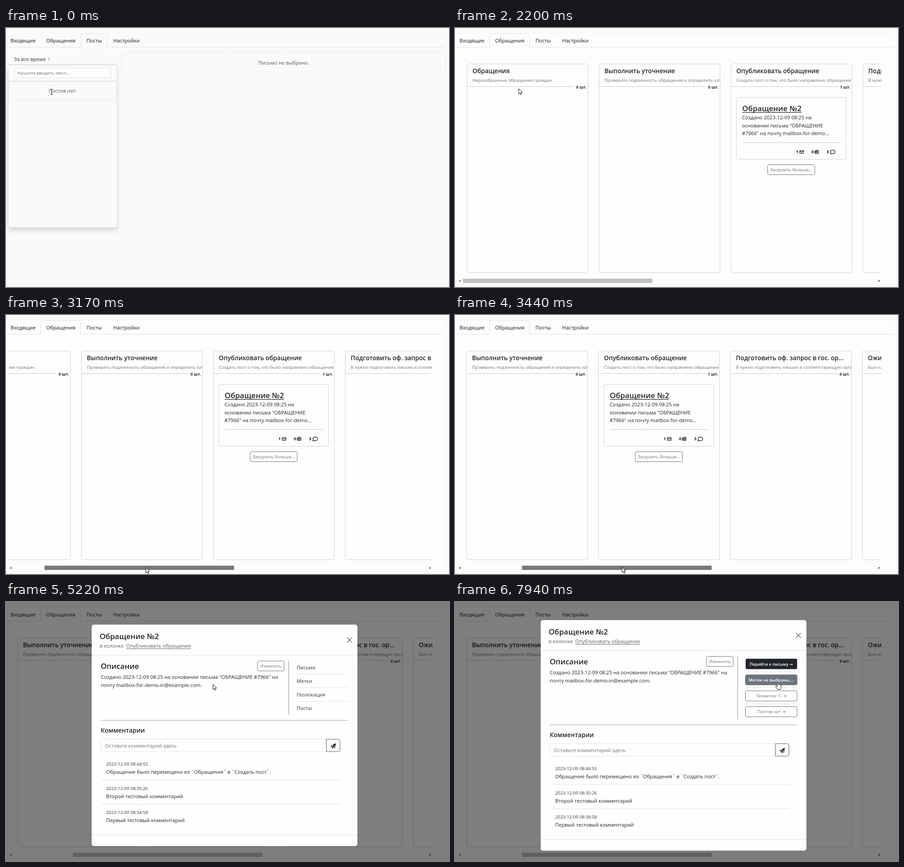
An HTML page with a canvas for the animation above (8 s loop, 977x573 px).

```html
<!DOCTYPE html>
<html lang="ru">
<head>
<meta charset="utf-8">
<title>Обращения</title>
<style>
  html, body { margin: 0; width: 100%; height: 100%; overflow: hidden; background: #fafafa; }
  canvas { display: block; width: 977px; height: 573px; }
</style>
</head>
<body>
<canvas id="stage"></canvas>
<script>
const W = 977, H = 573, LOOP = 8000, STEP = 120;
const canvas = document.getElementById('stage');
const ctx = canvas.getContext('2d');
const dpr = window.devicePixelRatio || 1;
canvas.width = W * dpr;
canvas.height = H * dpr;

const FONT = '"Open Sans", "Noto Sans", "DejaVu Sans", sans-serif';
const BODY = 11.1, SMALL = 9.65, H5 = 13.65, H4 = 16.6, TINY = 8.8;
const INK = '#212529', MUTED = '#6c757d', SOFT = '#dee2e6', EDGE = '#cfd1d3';

const OPEN_BOARD = 1650, LOAD_CARD = 1790, GRAB = 2930, RELEASE = 3690;
const OPEN_MODAL = 5220, LOAD_MODAL = 5370;

// Pointer moves: start time, number of steps, end point.
const MOVES = [
  [0, 1, 100, 141], [250, 5, 160, 153], [980, 1, 142, 130], [1130, 3, 115.5, 28],
  [2200, 5, 238, 560], [2930, 1, 247, 560.5], [3050, 2, 308, 559], [3320, 2, 368, 558],
  [3690, 5, 490, 234], [4290, 1, 493, 251], [4440, 1, 500, 247], [4590, 3, 352, 172],
  [5220, 1, 456, 182], [6660, 1, 476, 175], [6780, 5, 702, 140],
  [7410, 1, 702, 168], [7560, 1, 706, 171], [7700, 3, 712, 177]
];

const TABS = [
  { name: 'Входящие', x: 10 },
  { name: 'Обращения', x: 88.5, left: 76.5, right: 164.5 },
  { name: 'Посты', x: 177.5, left: 165.5, right: 223.5 },
  { name: 'Настройки', x: 236.5 }
];

const COLUMNS = [
  ['Обращения', 'Неразобранные обращения граждан.', 0],
  ['Выполнить уточнение', 'Проверить подлинность обращения и определить категорию.', 0],
  ['Опубликовать обращение', 'Создать пост о том, что было направлено обращение граждан.', 1],
  ['Подготовить оф. запрос в гос. ор...', 'В нужно подготовить письмо в соответствующую организацию.', 0],
  ['Ожидание ответа', 'Был направлен запрос в организацию.', 0]
];

const COMMENTS = [
  ['2023-12-09 08:44:55', 'Обращение было перемещено из `Обращения` в `Создать пост`.'],
  ['2023-12-09 08:35:26', 'Второй тестовый комментарий'],
  ['2023-12-09 08:34:58', 'Первый тестовый комментарий']
];

const SHAPES = {
  arrow: new Path2D('M.5 0V11.6L3.2 9.2L5 13.3L6.9 12.4L5.1 8.4H8.6Z'),
  hand: new Path2D('M-1.3 9V1.2C-1.3-.2 1.2-.2 1.2 1.2V6C1.6 5 3.4 5 3.6 6.3C4.2 5.5 5.5 5.8 5.6 7C6.3 6.5 7.1 7 7.1 8V12C7.1 14 6 14.5 6 16.5H-1C-1 14.5-3 13-4.6 10.6C-5.8 8.8-3.8 7.6-2.5 9.2L-1.3 10.6Z'),
  beam: new Path2D('M-2.5-5.5H-.6L0-5L.6-5.5H2.5M0-5V5.5M-2.5 6H-.6L0 5.5L.6 6H2.5'),
  mail: new Path2D('M.5 .5H8.5V7H.5ZM.5 1.5L4.5 4.6L8.5 1.5'),
  news: new Path2D('M2 .5H8.5V7.5H1.2Q.5 7.5 .5 6.5V2H2V6.8M3.4 2.4H5.2V4H3.4ZM6.2 2.4H7.4M6.2 4H7.4M3.4 5.7H7.4'),
  chat: new Path2D('M6.2 .6C9.3 .6 11.2 2.3 11.2 4.6S9.3 8.6 6.2 8.6C5.2 8.6 4.3 8.4 3.6 8.1C2.8 8.8 1.7 9.2 .6 9.2C1.3 8.5 1.7 7.8 1.8 6.9C1.3 6.2 1.1 5.5 1.1 4.6C1.1 2.3 3.1 .6 6.2 .6Z'),
  plane: new Path2D('M.8 6.8L11.2 .8L9.6 10.2L6.2 8.8L4.4 11V8ZM4.4 8L11.2 .8L6.2 8.8')
};

function text(str, x, cy, size = BODY, color = INK, weight = 400, align = 'left') {
  ctx.font = `${weight} ${size}px ${FONT}`;
  ctx.fillStyle = color;
  ctx.textAlign = align;
  ctx.fillText(str, x, cy + size * 0.36);
}

function underlined(str, x, cy, size, color, weight, thick) {
  text(str, x, cy, size, color, weight);
  ctx.fillRect(x, Math.round(cy + size * 0.36 + 2), ctx.measureText(str).width, thick);
}

function box(x, y, w, h, r, stroke, fill) {
  ctx.beginPath();
  ctx.roundRect(x, y, w, h, r);
  if (fill) { ctx.fillStyle = fill; ctx.fill(); }
  if (stroke) { ctx.strokeStyle = stroke; ctx.lineWidth = 1; ctx.stroke(); }
}

function line(x1, y1, x2, y2, color, width = 1) {
  ctx.beginPath();
  ctx.moveTo(x1, y1);
  ctx.lineTo(x2, y2);
  ctx.strokeStyle = color;
  ctx.lineWidth = width;
  ctx.stroke();
}

function triangle(x, y, dx, dy, color) {
  ctx.beginPath();
  ctx.moveTo(x + dx, y + dy);
  ctx.lineTo(x - dy, y + dx);
  ctx.lineTo(x + dy, y - dx);
  ctx.fillStyle = color;
  ctx.fill();
}

function shape(name, x, y, stroke, width, fill) {
  ctx.save();
  ctx.translate(x, y);
  ctx.lineJoin = 'round';
  if (fill) { ctx.fillStyle = fill; ctx.fill(SHAPES[name]); }
  ctx.strokeStyle = stroke;
  ctx.lineWidth = width;
  ctx.stroke(SHAPES[name]);
  ctx.restore();
}

function clipTo(x, y, w, h, draw) {
  ctx.save();
  ctx.beginPath();
  ctx.rect(x, y, w, h);
  ctx.clip();
  draw();
  ctx.restore();
}

const inside = (p, l, t, r, b) => p.x >= l && p.x <= r && p.y >= t && p.y <= b;

function pointerAt(t) {
  let from = { x: MOVES[0][2], y: MOVES[0][3] }, pos = from;
  for (const [start, steps, x, y] of MOVES) {
    if (t < start) break;
    const k = Math.min(1, (Math.floor((t - start) / STEP) + 1) / steps);
    pos = { x: from.x + (x - from.x) * k, y: from.y + (y - from.y) * k };
    from = { x, y };
  }
  return pos;
}

function scrollAt(t, p) {
  if (t < GRAB) return 0;
  return t < RELEASE ? 8 + 284 * (p.x - 247) / 121 : 292;
}

function drawTabs(active, hover, bg) {
  line(0, 42.5, 967, 42.5, SOFT);
  TABS.forEach((tab, i) => {
    if (i === active || i === hover) {
      const w = tab.right - tab.left;
      clipTo(tab.left - 1, 10, w + 2, i === active ? 33 : 32, () =>
        box(tab.left, 12.5, w, 40, 4, i === active ? SOFT : '#eceef0', bg));
    }
    text(tab.name, tab.x, 28.5, BODY, '#16181b');
  });
}

function drawPosts() {
  box(255.5, 55.5, 714, 42, 4, '#ebebec');
  text('Письмо не выбрано.', 612.5, 77, BODY, '#56595c', 400, 'center');
  text('За все время', 17.5, 69, BODY, '#33373b');
  text('⇩', 95, 69, 9, '#777', 400, 'center');

  ctx.save();
  ctx.shadowColor = 'rgba(0,0,0,.17)';
  ctx.shadowBlur = 12 * dpr;
  ctx.shadowOffsetY = 6 * dpr;
  box(6, 81, 238, 360, 4, null, '#fafafa');
  ctx.restore();
  line(6, 81.5, 244, 81.5, '#c9cacb');
  line(6, 117.5, 244, 117.5, '#d9dadb');
  box(18.5, 88.5, 213, 22, 3, SOFT, '#fdfdfd');
  text('Начните вводить текст...', 25, 100, SMALL, MUTED);
  box(6.5, 118.5, 237, 41, 3, '#ebebec');
  text('Постов нет.', 125, 139.5, BODY, '#56595c', 400, 'center');
}

function drawCard(x) {
  box(x + 12, 153.5, 242, 137, 4, EDGE);
  underlined('Обращение №2', x + 25, 178, H4, INK, 600, 1.3);
  ['Создано 2023-12-09 08:25 на', 'основании письма "ОБРАЩЕНИЕ', '#7966" на почту mailbox-for-demo...']
    .forEach((row, i) => text(row, x + 24.5, 198 + i * 17.6));
  line(x + 25, 253.5, x + 242, 253.5, '#c6c8ca');
  text('1', x + 143.5, 274, TINY, '#111', 700);
  shape('mail', x + 151.5, 270.5, '#111', 1.1);
  text('0', x + 177.5, 274, TINY, '#111', 700);
  shape('news', x + 184.5, 270, '#111', 1.1);
  text('3', x + 211, 274, TINY, '#111', 700);
  shape('chat', x + 218.5, 269.5, '#111', 1.2);
  box(x + 81, 302.5, 104, 22, 3, MUTED);
  text('Загрузить больше...', x + 133, 313.5, SMALL, MUTED, 400, 'center');
}

function drawColumn(x, [title, note, count], loaded) {
  box(x, 79.5, 267, 462, 4, EDGE);
  text(title, x + 12, 95, H5, INK, 600);
  clipTo(x, 100, 267, 28, () => text(note, x + 12, 115.5, SMALL, MUTED));
  line(x, 129.5, x + 236, 129.5, '#c9cbcd');
  text(count + ' шт.', x + 263.5, 130.5, TINY, INK, 700, 'right');
  if (count && loaded) drawCard(x);
}

function drawBoard(t, p, scroll) {
  clipTo(6, 78, 934, 470, () =>
    COLUMNS.forEach((col, i) => drawColumn(26.5 + 291 * i - scroll, col, t >= LOAD_CARD)));
  const thumb = 17.4 + scroll * 0.447;
  const held = t >= GRAB && t < RELEASE;
  const over = t < OPEN_MODAL && inside(p, thumb, 555, thumb + 418, 565);
  ctx.fillStyle = held ? '#787878' : over ? '#a8a8a8' : '#c1c1c1';
  ctx.fillRect(thumb, 554.5, 418, 9.5);
  triangle(12, 559.5, -2.8, 0, '#333');
  triangle(934, 559.5, 2.8, 0, '#333');
}

function sideButton(label, y, hover, caretX) {
  box(640.5, y, 114, 22.5, 3, MUTED, hover ? MUTED : null);
  if (caretX) {
    text(label, caretX - 8, y + 11.5, SMALL, MUTED, 400, 'right');
    triangle(caretX, y + 10.5, 0, 3, MUTED);
  } else {
    text(label, 697.5, y + 11.5, hover ? 9.3 : SMALL, hover ? '#fff' : MUTED, hover ? 600 : 400, 'center');
  }
}

function drawSide(top, loaded, p) {
  if (!loaded) {
    ['Письма', 'Метки', 'Геолокация', 'Посты'].forEach((label, i) => {
      text(label, 641, top + 95.5 + i * 30, BODY, '#33373b');
      if (i < 3) line(641, top + 109.5 + i * 30, 754, top + 109.5 + i * 30, SOFT);
    });
    return;
  }
  const hot = onButton(p);
  box(641, top + 85.5, 113.5, 23, 3, null, hot === 1 ? '#424649' : INK);
  text('Перейти к письму →', 697.5, top + 97.5, 9.3, '#fff', 600, 'center');
  [114.5, 149.5, 185.5].forEach(y => line(641, top + y, 754, top + y, SOFT));
  sideButton('Метки не выбраны....', top + 121, hot === 2);
  sideButton('Геометок: 1.', top + 156.5, false, 729);
  sideButton('Постов нет', top + 191.5, false, 726);
}

function drawModal(loaded, p) {
  ctx.fillStyle = 'rgba(0,0,0,.5)';
  ctx.fillRect(0, 0, W, H);
  const top = loaded ? 40 : 50, grow = loaded ? 20 : 0;
  box(189, top, 586, 490 + grow, 5, null, '#fefefe');

  text('Обращение №2', 206.5, top + 26, H4, INK, 600);
  text('в колонке', 206.5, top + 47.5, BODY, '#5c6267', 500);
  underlined('Опубликовать обращение', 265, top + 47.5, BODY, '#5c6267', 500, 1);
  line(752, top + 28.5, 763, top + 39.5, '#6f6f6f', 1.4);
  line(763, top + 28.5, 752, top + 39.5, '#6f6f6f', 1.4);
  line(189, top + 67.5, 775, top + 67.5, SOFT);

  text('Описание', 209, top + 92, H4, INK, 600);
  box(554.5, top + 80.5, 59, 22, 3, MUTED);
  text('Изменить', 584, top + 92, SMALL, MUTED, 400, 'center');
  text('Создано 2023-12-09 08:25 на основании письма "ОБРАЩЕНИЕ #7966" на', 209, top + 116.5);
  text('почту mailbox-for-demo-in@example.com.', 209, top + 134);
  line(623.5, top + 80, 623.5, top + 199.5 + grow, '#8b8d8f');
  drawSide(top, loaded, p);

  const y = top + grow;
  line(209, y + 211.8, 754.5, y + 211.8, '#bfc1c3', 1.4);
  text('Комментарии', 209, y + 234, H5, INK, 600);
  box(208.5, y + 253.5, 498, 27.5, [4, 0, 0, 4], SOFT);
  text('Оставьте комментарий здесь', 218, y + 268, BODY, MUTED);
  box(706.5, y + 253.5, 30, 27.5, [0, 4, 4, 0], '#555b60');
  shape('plane', 715.5, y + 262.5, '#111', 1.2);
  COMMENTS.forEach(([date, note], i) => {
    const row = y + 308.5 + i * 53.6;
    text(date, 221, row, 9.75, '#33373b');
    text(note, 221, row + 17.5);
    if (i < 2) line(209, Math.floor(row + 35) + 0.5, 737, Math.floor(row + 35) + 0.5, SOFT);
  });
  line(189, y + 465.5, 775, y + 465.5, SOFT);
}

function onButton(p) {
  if (inside(p, 641, 125, 754, 149)) return 1;
  return inside(p, 641, 161, 754, 184) ? 2 : 0;
}

const onTab = p => inside(p, 76, 12, 165, 42);

function cursorKind(t, p) {
  if (t >= OPEN_MODAL) return t >= LOAD_MODAL && onButton(p) ? 'hand' : 'arrow';
  if (onTab(p)) return 'hand';
  if (t < OPEN_BOARD) {
    const overText = inside(p, 94, 132, 156, 147) || inside(p, 18, 88, 231, 111);
    return overText ? 'beam' : 'arrow';
  }
  return t >= RELEASE && inside(p, 341, 170, 475, 188) ? 'hand' : 'arrow';
}

function drawCursor(t, p) {
  const kind = cursorKind(t, p);
  if (kind === 'beam') shape(kind, Math.round(p.x) + 0.5, Math.round(p.y), '#111', 1.1);
  else shape(kind, p.x, p.y, '#111', 1, '#fff');
}

function render(t) {
  const p = pointerAt(t), board = t >= OPEN_BOARD;
  ctx.setTransform(dpr, 0, 0, dpr, 0, 0);
  ctx.fillStyle = '#fafafa';
  ctx.fillRect(0, 0, W, H);
  if (board) {
    ctx.fillStyle = '#fdfdfd';
    ctx.fillRect(0, 13, 970, 551);
  }
  drawTabs(board ? 1 : 2, !board && onTab(p) ? 1 : -1, board ? '#fdfdfd' : '#fafafa');
  if (board) drawBoard(t, p, scrollAt(t, p));
  else drawPosts();
  if (t >= OPEN_MODAL) drawModal(t >= LOAD_MODAL, p);
  drawCursor(t, p);
}

const begin = performance.now();
function tick() {
  render((performance.now() - begin) % LOOP);
  requestAnimationFrame(tick);
}
tick();
</script>
</body>
</html>
```
